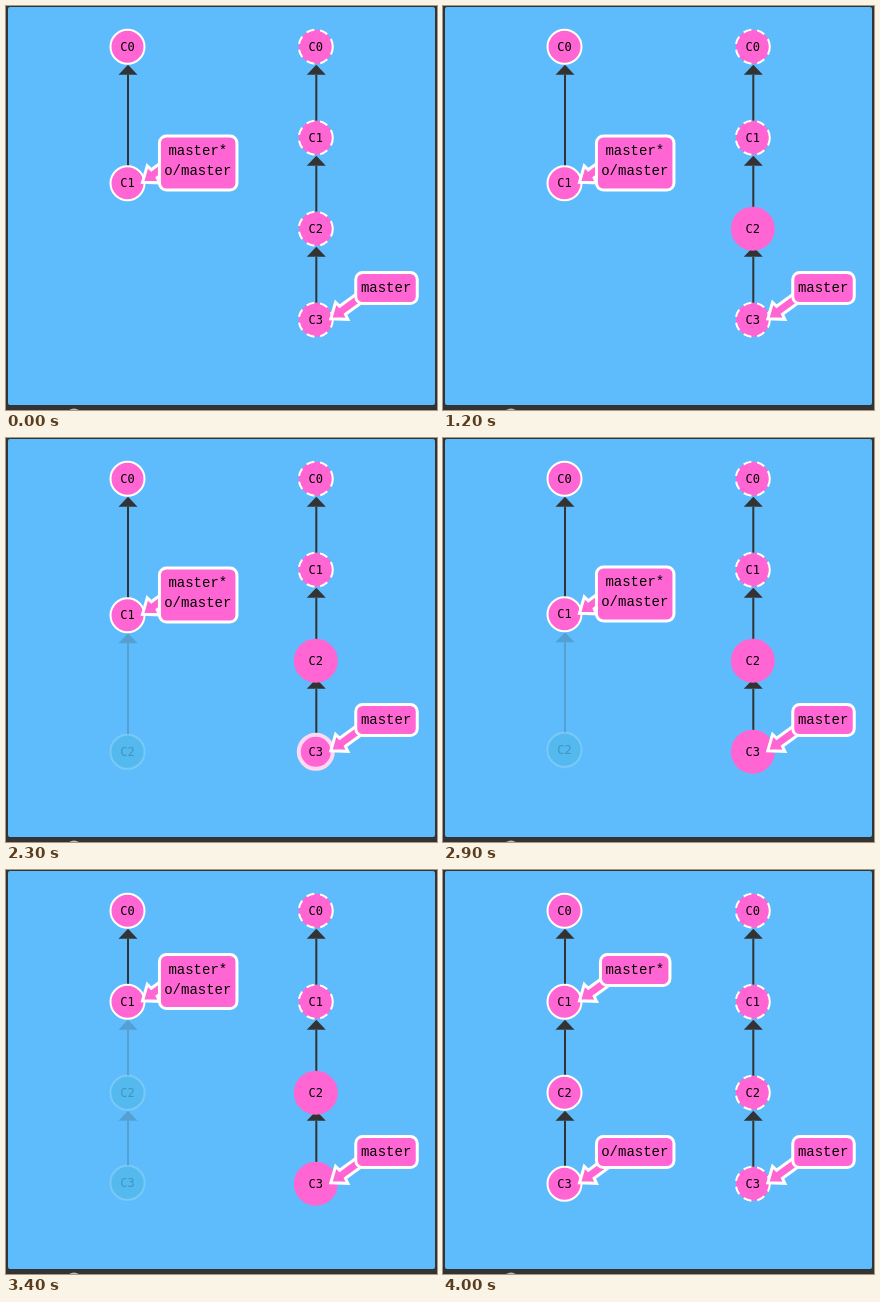
These frames come from a looping animation (431 by 404 pixels, 5.7 s). An HTML page with a canvas:

```html
<!DOCTYPE html>
<html lang="en">
<head>
<meta charset="utf-8">
<title>Fetching commits</title>
<style>
  html, body { margin: 0; width: 100%; height: 100%; overflow: hidden; background: #333; }
  canvas { display: block; }
</style>
</head>
<body>
<canvas id="stage" width="431" height="404"></canvas>
<script>
const ctx = document.getElementById('stage').getContext('2d');

const LOOP = 5700, STEP = 100;
const SKY = '#5ebcfc', DARK = '#333', WHITE = [255, 255, 255];
const PINK = [255, 102, 211], TEAL = [40, 168, 184];
const LEFT = 121.5, RIGHT = 309.8, RADIUS = 17;
const ROWS = [40.8, 131.8, 222.8, 313.8];
const FAINT = 0.2;

const mix = (a, b, p) => a + (b - a) * p;
const blend = (a, b, p) => `rgb(${a.map((v, i) => Math.round(mix(v, b[i], p)))})`;

// Ease in and out; lag delays the middle of the move.
function ramp(t, start, end, lag = 0.5) {
  const x = Math.min(1, Math.max(0, (t - start) / (end - start)));
  const n = x * (1 - lag + lag * x ** 1.5);
  return n * n * (3 - 2 * n);
}

function withAlpha(alpha, draw) {
  ctx.save();
  ctx.globalAlpha = alpha;
  draw();
  ctx.restore();
}

function edge(x, parentY, childY, alpha = 1) {
  const top = parentY + 18;
  withAlpha(alpha, () => {
    ctx.fillStyle = DARK;
    ctx.fillRect(x - 0.5, top + 10, 2, Math.max(0, childY - RADIUS - top - 10));
    ctx.beginPath();
    ctx.moveTo(x + 0.5, top);
    ctx.lineTo(x + 10, top + 10);
    ctx.lineTo(x - 9, top + 10);
    ctx.fill();
  });
}

function node(x, y, name, { fill = blend(PINK, PINK, 0), alpha = 1, glow = 0, dashed = false } = {}) {
  withAlpha(alpha, () => {
    const width = mix(2, 10, glow);
    ctx.beginPath();
    ctx.arc(x, y, RADIUS, 0, 2 * Math.PI);
    ctx.fillStyle = fill;
    ctx.fill();
    ctx.lineWidth = width;
    ctx.strokeStyle = blend(WHITE, PINK, glow);
    ctx.setLineDash(dashed ? [4 * width, 3 * width] : []);
    ctx.stroke();
    ctx.fillStyle = '#000';
    ctx.font = '12px "DejaVu Sans Mono", monospace';
    ctx.textAlign = 'center';
    ctx.fillText(name, x, y + 4);
  });
}

function outlined() {
  ctx.fillStyle = blend(PINK, PINK, 0);
  ctx.strokeStyle = '#fff';
  ctx.lineWidth = 3;
  ctx.fill();
  ctx.stroke();
}

// Box beside a node, with an arrow whose tip touches that node.
function tag(nodeX, nodeY, top, width, height, alpha = 1) {
  withAlpha(alpha, () => {
    ctx.save();
    ctx.translate(nodeX + 15, nodeY - 1);
    ctx.rotate(-Math.PI / 5);
    ctx.beginPath();
    [[0, 0], [13.5, -10.5], [14.5, -5], [62, -5], [62, 5], [14.5, 5], [13.5, 10.5]]
      .forEach(([x, y]) => ctx.lineTo(x, y));
    ctx.closePath();
    outlined();
    ctx.restore();
    ctx.beginPath();
    ctx.roundRect(nodeX + 70.7 - width / 2, top, width, height, 7);
    outlined();
  });
}

function tagText(nodeX, top, text) {
  ctx.fillStyle = '#000';
  ctx.font = '14px "Liberation Mono", "Courier New", monospace';
  ctx.textAlign = 'center';
  ctx.fillText(text, nodeX + 70.3, top + 19);
}

function background() {
  ctx.fillStyle = DARK;
  ctx.fillRect(0, 0, 431, 404);
  ctx.fillStyle = SKY;
  ctx.beginPath();
  ctx.roundRect(2, 1, 427, 398, 2);
  ctx.fill();
  ctx.fillStyle = '#bbb';
  ctx.beginPath();
  ctx.arc(68, 411, 8.5, 0, 2 * Math.PI);
  ctx.fill();
}

function drawRemote(t, settle) {
  const glows = [0, 0, ramp(t, 600, 1200), ramp(t, 2100, 2600, 0.25)];
  ROWS.slice(1).forEach((y, i) => edge(RIGHT, ROWS[i], y));
  ROWS.forEach((y, i) => node(RIGHT, y, 'C' + i, {
    glow: glows[i] * (1 - settle),
    dashed: glows[i] === 0 || settle > 0
  }));
  const top = ROWS[3] - 47.3;
  tag(RIGHT, ROWS[3], top, 61.5, 31);
  tagText(RIGHT, top, 'master');
}

function drawLocal(t, settle) {
  const shift = ramp(t, 2800, 3400);
  const c1 = mix(177.3, ROWS[1], shift);
  const c2 = mix(ROWS[3], ROWS[2], shift);
  const c3 = mix(ROWS[3] - 1, ROWS[3], settle);
  const alpha2 = mix(FAINT * ramp(t, 1500, 2100), 1, settle);
  const alpha3 = mix(FAINT * shift, 1, settle);
  const fill = blend(TEAL, PINK, settle);

  edge(LEFT, ROWS[0], c1);
  edge(LEFT, c1, c2, alpha2);
  edge(LEFT, c2, c3, alpha3);
  node(LEFT, ROWS[0], 'C0');
  node(LEFT, c3, 'C3', { fill, alpha: alpha3 });
  node(LEFT, c2, 'C2', { fill, alpha: alpha2 });
  node(LEFT, c1, 'C1');

  // The shared box shrinks while the second tag slides down to C3.
  const height = mix(54, 31, settle);
  const top = c1 - 47.3;
  const movingTop = mix(top + 20, ROWS[3] - 47.3, settle);
  tag(LEFT, c1, top, mix(77.5, 69.5, settle), height);
  tag(LEFT, mix(c1, ROWS[3], settle), movingTop, 77.5, height, settle);
  tagText(LEFT, top, 'master*');
  tagText(LEFT, movingTop, 'o/master');
}

function frame() {
  const t = Math.floor(performance.now() % LOOP / STEP) * STEP;
  const settle = ramp(t, 3400, 4000);
  background();
  drawLocal(t, settle);
  drawRemote(t, settle);
  requestAnimationFrame(frame);
}
frame();
</script>
</body>
</html>
```
